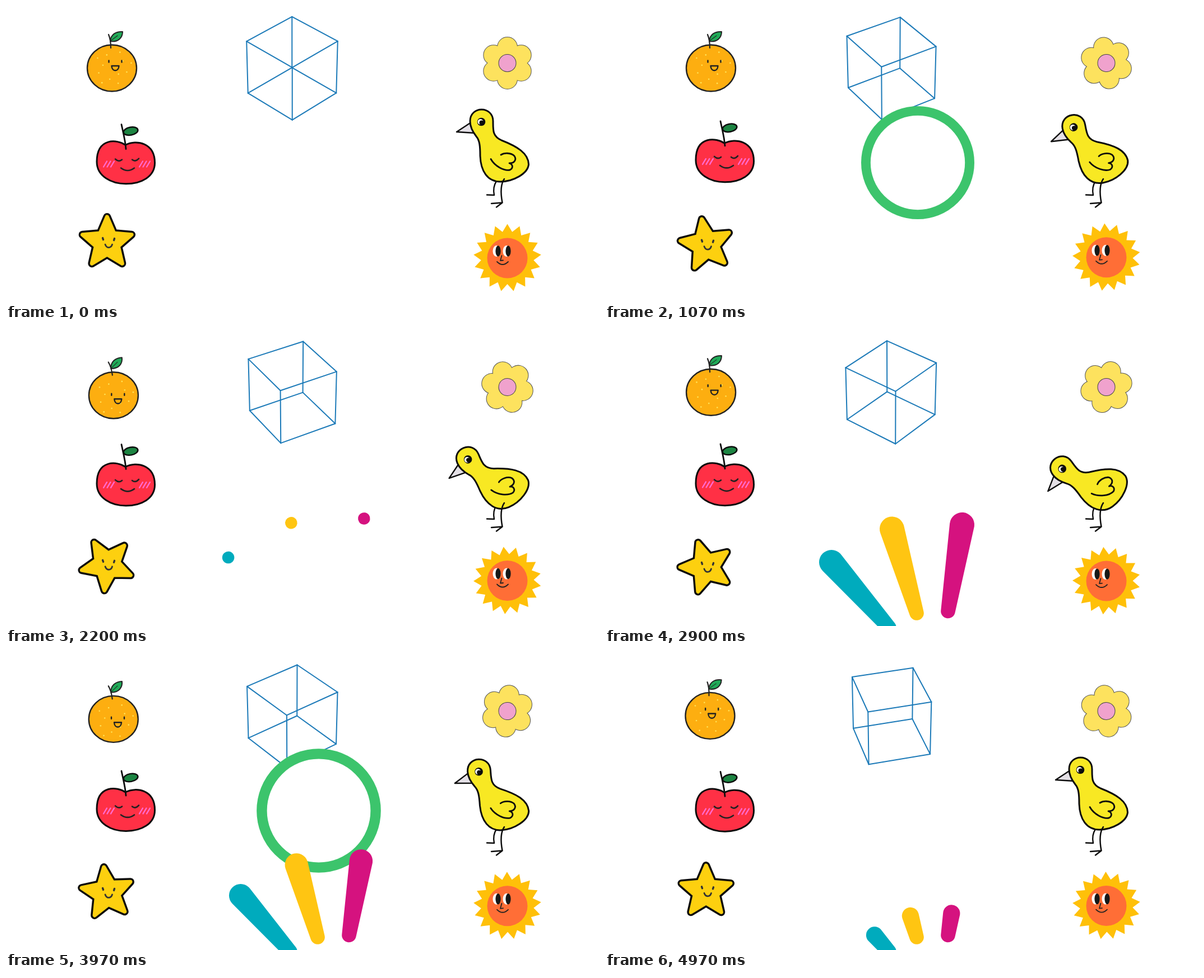
Animation of 1058x529 px, one loop 5010 ms. Source, as an HTML page with a canvas:

```html
<!DOCTYPE html>
<html lang="en">
<head>
<meta charset="utf-8">
<title>Doodles</title>
<style>
html, body { margin: 0; width: 100%; height: 100%; overflow: hidden; background: #fff; }
canvas { display: block; width: 1058px; height: 529px; }
</style>
</head>
<body>
<canvas id="stage" width="1058" height="529"></canvas>
<script>
const ctx = document.getElementById('stage').getContext('2d');
const LOOP = 5010, TAU = Math.PI * 2, INK = '#0c0c0c';
const rad = d => d * Math.PI / 180;
const clamp = (x, lo = 0, hi = 1) => Math.max(lo, Math.min(hi, x));
const mix = (a, b, k) => a + (b - a) * k;
// Eased 0 to 1 between two times.
const ease = (t, from, to) => {
  const x = clamp((t - from) / (to - from));
  return x * x * (3 - 2 * x);
};
// Half a sine wave between two times.
const pulse = (t, from, to) => Math.sin(Math.PI * clamp((t - from) / (to - from)));
// Bell curve on a looping phase.
const bell = (phase, centre, width) => {
  const d = phase - centre - Math.round(phase - centre);
  return Math.exp(-((d / width) ** 2));
};

function paint(path, fill, stroke, width) {
  if (fill) { ctx.fillStyle = fill; ctx.fill(path); }
  if (stroke) { ctx.strokeStyle = stroke; ctx.lineWidth = width; ctx.stroke(path); }
}
const shape = (d, fill, stroke, width) => paint(new Path2D(d), fill, stroke, width);

function oval(x, y, rx, ry, fill, stroke, width, turn = 0) {
  const p = new Path2D();
  p.ellipse(x, y, rx, ry, turn, 0, TAU);
  paint(p, fill, stroke, width);
}
const disc = (x, y, r, fill, stroke, width) => oval(x, y, r, r, fill, stroke, width);

function line(x1, y1, x2, y2, color, width) {
  ctx.strokeStyle = color;
  ctx.lineWidth = width;
  ctx.beginPath();
  ctx.moveTo(x1, y1);
  ctx.lineTo(x2, y2);
  ctx.stroke();
}

function at(x, y, deg, draw) {
  ctx.save();
  ctx.translate(x, y);
  ctx.rotate(rad(deg));
  draw();
  ctx.restore();
}

function starPath(n, outer, inner) {
  const p = new Path2D();
  for (let i = 0; i < 2 * n; i++) {
    const a = i * Math.PI / n, r = i % 2 ? inner : outer;
    p.lineTo(r * Math.sin(a), -r * Math.cos(a));
  }
  p.closePath();
  return p;
}

function cube(t) {
  const point = (i, up) => {
    const a = rad(t * 0.157 + i * 90), x = 80 * Math.sin(a), z = 80 * Math.cos(a), h = up * 56.5;
    const k = 2070 / (2070 - z * 0.818 - h * 0.575);
    return [510.5 + x * k, 110 + (z * 0.575 - h * 0.818) * k];
  };
  for (let i = 0; i < 4; i++) {
    const top = point(i, 1), low = point(i, -1);
    line(...top, ...point(i + 1, 1), '#1c7ab8', 2);
    line(...low, ...point(i + 1, -1), '#1c7ab8', 2);
    line(...top, ...low, '#1c7ab8', 2);
  }
}

function orange(t) {
  const phase = t / 880 % 1;
  const left = bell(phase, 0.75, 0.085), down = bell(phase, 0.48, 0.1);
  const x = 189 + 3 * down - 7 * left, y = 111 + 6 * down - 4 * left;
  const fx = 195 + 5 * down - 19 * left, fy = 105 + 17 * down - 6 * left;
  oval(x, y, 44, 41.5, '#fdae10', '#222', 2.4);
  for (let i = 3; i < 15; i++) {
    const r = 9.2 * Math.sqrt(i), a = i * 2.4;
    disc(x + r * Math.cos(a) + (fx - x) / 3, y + r * Math.sin(a) + (fy - y) / 3, 1.3, '#ffe45a');
  }
  at(x - 2, y - 36, 12 * left - 8 * down, () => {
    shape('M0 0C0 -9 -1 -17 -4 -24', null, '#222', 2.2);
    shape('M-1 -12C0 -24 9 -30 21 -29C21 -18 13 -10 -1 -12Z', '#20aa58', '#222', 2);
    line(0, -13, 12, -22, '#222', 1);
  });
  at(fx, fy, 0, () => {
    for (const side of [-11.5, 11.5]) line(side, -7.5, side, -4.5, '#222', 2.4);
    shape('M-6.5 2H6.5C6 13 -6 13 -6.5 2Z', '#fdae10', '#222', 2.4);
  });
}

function apple(t) {
  const bob = -3 + 5 * Math.cos(TAU * (t / 384 - 0.12));
  at(0, bob * 0.5, 0, () => shape('M213 248C199 238 162 234 162 278C162 304 188 317.5 214 317.5' +
    'C241 317.5 265.5 305 265.5 280C265.5 244 233 238 213 248Z', '#ff3045', INK, 3));
  at(0, bob * 0.95, 0, () => {
    shape('M206 211C208 221 213 240 214 255', null, INK, 2.8);
    oval(222.5, 223, 13, 7, '#1c8442', INK, 2.5, rad(-11));
  });
  at(0, bob * 0.75, 0, () => {
    for (const x of [174, 238]) {
      for (let i = 0; i < 3; i++) line(x + i * 6.5, 287, x + i * 6.5 + 6, 277, '#ff6bd0', 2.3);
    }
    shape('M195 273Q201 279 207 274M225 274Q231 279 237 272M205 289Q217 298 229 289', null, '#222', 2.6);
  });
}

const STAR = starPath(5, 46, 21);

function star(t) {
  const phase = t / 620 % 1;
  const hop = 4 * Math.sin(3 * TAU * phase);
  at(180.3, 422.8 + hop, -31 * bell(phase, 0.575, 0.14), () => {
    paint(STAR, null, INK, 14);
    paint(STAR, '#fdd00f', '#fdd00f', 7);
  });
  at(183, 422 + hop, 0, () => {
    line(-10.5, -7.5, -9.5, -4.5, '#333', 3.4);
    line(10.5, -6.5, 9.5, -3.5, '#333', 3.4);
    shape('M-6 4Q-4 9.5 0 9.5Q5 9.5 6.5 4', null, '#333', 2.8);
  });
}

function flower(t) {
  at(894.5, 102, t * 0.0468, () => {
    const petals = (fill, stroke) => {
      for (let i = 0; i < 6; i++) {
        const a = i * TAU / 6;
        disc(28.5 * Math.sin(a), -28.5 * Math.cos(a), 17.5, fill, stroke, 2);
      }
    };
    petals(null, '#555');
    petals('#fde25e');
    disc(0, 0, 20, '#fde25e');
    disc(0, 0, 15.5, '#f0a2cd', '#444', 1);
  });
}

function bird(t) {
  const phase = t / 1180 % 1;
  const peck = -70 * (ease(phase, 0.33, 0.585) - ease(phase, 0.68, 0.98));
  shape('M875 313Q868 324 871 338L858 337.5', null, INK, 2.4);
  at(896, 278, peck, () => {
    ctx.translate(-896, -278);
    shape('M804 225L829 208.5L836 227Z', '#e4e0e6', INK, 2.4);
    shape('M828 206C828 178 869 178 869 206C869 222 868 233 884 240C912 251 932 263 932.5 283' +
      'C931 300 904 314 882 314C859 314 847 295 846 268C846 250 845 240 839 233C832 224 828 216 828 206Z',
      '#f8e823', INK, 3);
    disc(848, 207, 7.3, INK);
    disc(846.5, 207, 5, '#fff');
    disc(848.5, 208.5, 4, INK);
    shape('M865 273.5C872 286 888 295 899 293C905 290 905 283 898 281C908 281 911 274 907 268' +
      'C901 262 889 262 883 266', null, INK, 2.8);
  });
  shape('M889 309Q880 322 885.5 351.5L866 353M885.5 351.5L875 359.5', null, INK, 2.5);
}

const RAYS = starPath(17, 60.5, 47);

function sun(t) {
  const nod = Math.sin(Math.PI * t / 4400) ** 2;
  at(894.5, 450 - 2.5 * nod, 0, () => {
    at(0, 0, -6.5 * nod, () => paint(RAYS, '#ffc009'));
    disc(0, 0.5, 36, '#ff6e36');
    const blink = t > 3480 && t < 3640;
    for (const x of [-18.5, -0.5]) {
      if (blink) {
        line(x - 4, -5, x + 2, -4, '#e2552f', 1);
      } else {
        oval(x - 1, -12, 6.5, 10, '#fff');
        oval(x + 2, -12, 4.6, 9.7, '#181818');
      }
    }
    shape('M-10 -4L-12.5 5L-7.5 4.5M-18.5 7Q-8.5 17 1.5 7', null, '#222', 1.8);
  });
}

const RED = '#e04f3f', GREEN = '#3cc46c';

function ray(deg, from, to) {
  if (to - from < 0.5) return;
  const x = Math.cos(rad(deg)), y = Math.sin(rad(deg));
  line(x * from, y * from, x * to, y * to, RED, 4.8);
}

function square(side, deg, width) {
  at(0, 0, deg, () => {
    ctx.strokeStyle = RED;
    ctx.lineWidth = width;
    ctx.strokeRect(-side / 2, -side / 2, side, side);
  });
}

function rings(p) {
  const size = ease(p, 100, 600) - ease(p, 900, 1420);
  if (size > 0) disc(0, 0, 124 * size, null, GREEN, 22.5 * size);

  ctx.lineCap = 'butt';
  const head = 180 * ease(p, 240, 726), tail = 180 * ease(p, 700, 1000);
  for (const base of [-90, 90]) {
    if (head <= tail) continue;
    const arc = new Path2D();
    arc.arc(0, 0, 176.5, rad(base + tail), rad(base + head));
    paint(arc, null, GREEN, 4.6);
  }

  const flash = pulse(p, 400, 800);
  if (flash > 0) {
    for (const side of [-1, 1]) {
      line(70 * side, 38 * side - 20.5 * flash, 70 * side, 38 * side + 20.5 * flash, RED, 2.6);
    }
    const spin = (p - 600) * 0.1;
    square(35 * flash, 20 + spin * 2, 1.8);
    square(21 * flash, 8 + spin, 2.5);
    square(8 * flash, 3, 5.5 * flash);
  }
  ctx.lineCap = 'round';
}

function burst(p) {
  const outer = clamp((p - 1275) * 0.81, 0, 215), inner = clamp((p - 1376) * 1.03, 0, 215);
  const tip = 42 + clamp((p - 1379) * 0.385, 0, 78), end = 42 + 78 * clamp((p - 1390) / 290) ** 2;
  for (const side of [0, 180]) {
    for (const deg of [-22, 0, 22]) ray(side + deg, inner, outer);
    for (const deg of [-12, 12]) ray(side + deg, end, tip);
  }
}

function firework(t) {
  const p = t % 2930;
  at(558, 280, 0, () => {
    rings(p);
    burst(p);
  });
}

// Each rod: foot, head, colour.
const RODS = [[507, 532, 404, 415, '#00abbd'], [556, 506, 512, 355.5, '#ffc512'], [612, 502.5, 637, 348, '#d5127f']];

function rods(t) {
  const p = t % 1200;
  if (p < 20 || p > 1050) return;
  const head = ease(p, 20, 480), tail = ease(p, 500, 960);
  const grow = clamp((p - 20) / 60) * clamp((1050 - p) / 100);
  for (const [fx, fy, hx, hy, color] of RODS) {
    const len = Math.hypot(hx - fx, hy - fy), ux = (hx - fx) / len, uy = (hy - fy) / len;
    // While the head shrinks its far edge stays in place.
    const slip = p > 950 ? 22 * (1 - grow) : 0;
    const spot = k => [fx + ux * (len * k + slip), fy + uy * (len * k + slip), mix(12.8, 22, k) * grow];
    const [x1, y1, r1] = spot(tail), [x2, y2, r2] = spot(head);
    const dir = Math.atan2(uy, ux), gap = len * (head - tail);
    const open = gap > Math.abs(r2 - r1) ? Math.acos((r1 - r2) / gap) : Math.PI / 2;
    ctx.fillStyle = color;
    ctx.beginPath();
    ctx.arc(x2, y2, r2, dir - open, dir + open);
    ctx.arc(x1, y1, r1, dir + open, dir - open + TAU);
    ctx.fill();
  }
}

function frame(now) {
  const t = now % LOOP;
  ctx.fillStyle = '#fff';
  ctx.fillRect(0, 0, 1058, 529);
  ctx.lineCap = ctx.lineJoin = 'round';
  for (const draw of [cube, firework, rods, orange, apple, star, flower, bird, sun]) draw(t);
}

const start = performance.now();
function tick() {
  frame(performance.now() - start);
  requestAnimationFrame(tick);
}
tick();
</script>
</body>
</html>
```
